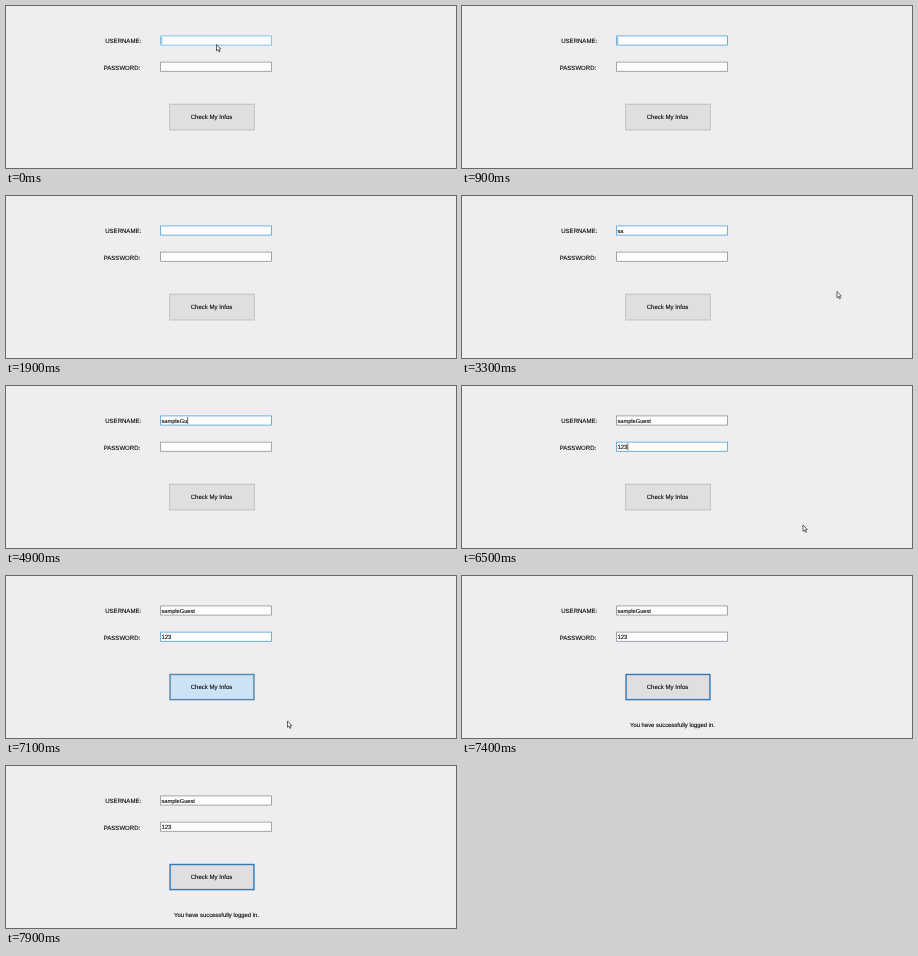
An HTML page with a canvas that plays this animation: 450 by 162 pixels, repeating every 8 s.

```html
<!DOCTYPE html>
<html lang="en">
<head>
<meta charset="utf-8">
<title>Login form</title>
<style>
  html, body { margin: 0; width: 100%; height: 100%; overflow: hidden; background: #efedef; }
  canvas { display: block; }
</style>
</head>
<body>
<canvas id="stage" width="450" height="162"></canvas>
<script>
const ctx = document.getElementById('stage').getContext('2d');
const LOOP = 8000;
const STEP = 100;

const userField = { y: 29.5, text: 'sampleGuest', size: 5.7, baseline: 36.9,
  keys: [3100, 3200, 3800, 4100, 4300, 4400, 4600, 4900, 5000, 5200, 5300] };
const passField = { y: 55.7, text: '123', size: 6, baseline: 62.9,
  keys: [6000, 6300, 6400] };
const FIELD = { x: 154.2, w: 111.6, h: 10 };

const TAB_TO_PASS = 5500, TAB_TO_BUTTON = 7000;
const PRESS = 7100, RELEASE = 7200, MESSAGE = 7300;

// Mouse stops: time, x, y
const mousePaths = [
  { end: 100, stops: [[0, 210.5, 38.5]] },
  { end: 3800, stops: [[3200, 350, 129], [3300, 375, 95.5]] },
  { end: 7400, stops: [[6500, 341, 139], [6600, 322, 143], [6900, 281.5, 145]] }
];

// Times at which the caret turns on and off
const caretSpans = [[0, 100], [900, 1900], [2400, 2900], [3400, 3600], [3800, 5500],
  [5500, 5900], [6000, 6900]];

const within = (t, a, b) => t >= a && t < b;

function label(text, x, y, size = 6.05) {
  ctx.font = size + 'px "Liberation Sans", Arial, sans-serif';
  ctx.textRendering = 'geometricPrecision';
  ctx.fillStyle = ctx.strokeStyle = '#0c0c0e';
  ctx.lineWidth = 0.12;
  ctx.fillText(text, x, y);
  ctx.strokeText(text, x, y);
}

function box(x, y, w, h, fill, stroke, line) {
  ctx.fillStyle = fill;
  ctx.fillRect(x, y, w, h);
  ctx.strokeStyle = stroke;
  ctx.lineWidth = line;
  ctx.strokeRect(x + line / 2, y + line / 2, w - line, h - line);
}

function drawField(field, border, focused, t) {
  box(FIELD.x, field.y, FIELD.w, FIELD.h, '#fdfdfe', border, 0.8);
  const typed = field.text.slice(0, field.keys.filter(k => k <= t).length);
  label(typed, 155.4, field.baseline, field.size);
  if (focused && caretSpans.some(([a, b]) => within(t, a, b))) {
    const x = 155.5 + ctx.measureText(typed).width;
    ctx.fillStyle = typed.length > 1 ? '#22252a' : '#5d8fae';
    ctx.fillRect(x, field.y + 1.7, 0.7, 6.8);
  }
}

function drawButton(t) {
  const pressed = within(t, PRESS, RELEASE);
  const focused = t >= TAB_TO_BUTTON;
  box(163.4, 97.8, 85.2, 26.5,
    pressed ? '#cce3f5' : '#e0dee0',
    pressed ? '#5686a8' : focused ? '#3479b8' : '#b5b3b6',
    focused ? 1.4 : 0.7);
  label('Check My Infos', 184.7, 113.3);
}

function drawMouse(t) {
  const path = mousePaths.find(p => within(t, p.stops[0][0], p.end));
  if (!path) return;
  const stops = path.stops;
  let i = 0;
  while (i < stops.length - 1 && stops[i + 1][0] <= t) i++;
  const [t0, x0, y0] = stops[i];
  const [t1, x1, y1] = stops[i + 1] || [t0 + 1, x0, y0];
  const k = Math.min(1, (t - t0) / (t1 - t0));
  ctx.save();
  ctx.translate(x0 + (x1 - x0) * k, y0 + (y1 - y0) * k);
  ctx.beginPath();
  [[0, 0], [0, 6.3], [1.4, 5], [2.5, 7.4], [3.5, 6.9], [2.5, 4.7], [4.3, 4.5]]
    .forEach(([x, y]) => ctx.lineTo(x, y));
  ctx.closePath();
  ctx.fillStyle = '#fff';
  ctx.fill();
  ctx.strokeStyle = '#303034';
  ctx.lineWidth = 0.75;
  ctx.stroke();
  ctx.restore();
}

function draw(time) {
  const t = Math.floor(time % LOOP / STEP) * STEP;
  ctx.fillStyle = '#efedef';
  ctx.fillRect(0, 0, 450, 162);

  label('USERNAME:', 99.2, 37.1);
  label('PASSWORD:', 97.7, 64.3);

  const onUser = t < TAB_TO_PASS;
  const onPass = !onUser && t < TAB_TO_BUTTON;
  const grey = '#908e94', blue = '#4a9dd4';
  drawField(userField, onUser ? (t < 100 ? '#66b8e2' : blue) : grey, onUser, t);
  drawField(passField, onPass || within(t, TAB_TO_BUTTON, RELEASE) ? blue : grey, onPass, t);
  drawButton(t);

  if (t >= MESSAGE) label('You have successfully logged in.', 168, 150.6, 5.9);
  drawMouse(t);
}

const start = performance.now();
function tick() {
  draw(performance.now() - start);
  requestAnimationFrame(tick);
}
tick();
</script>
</body>
</html>
```
